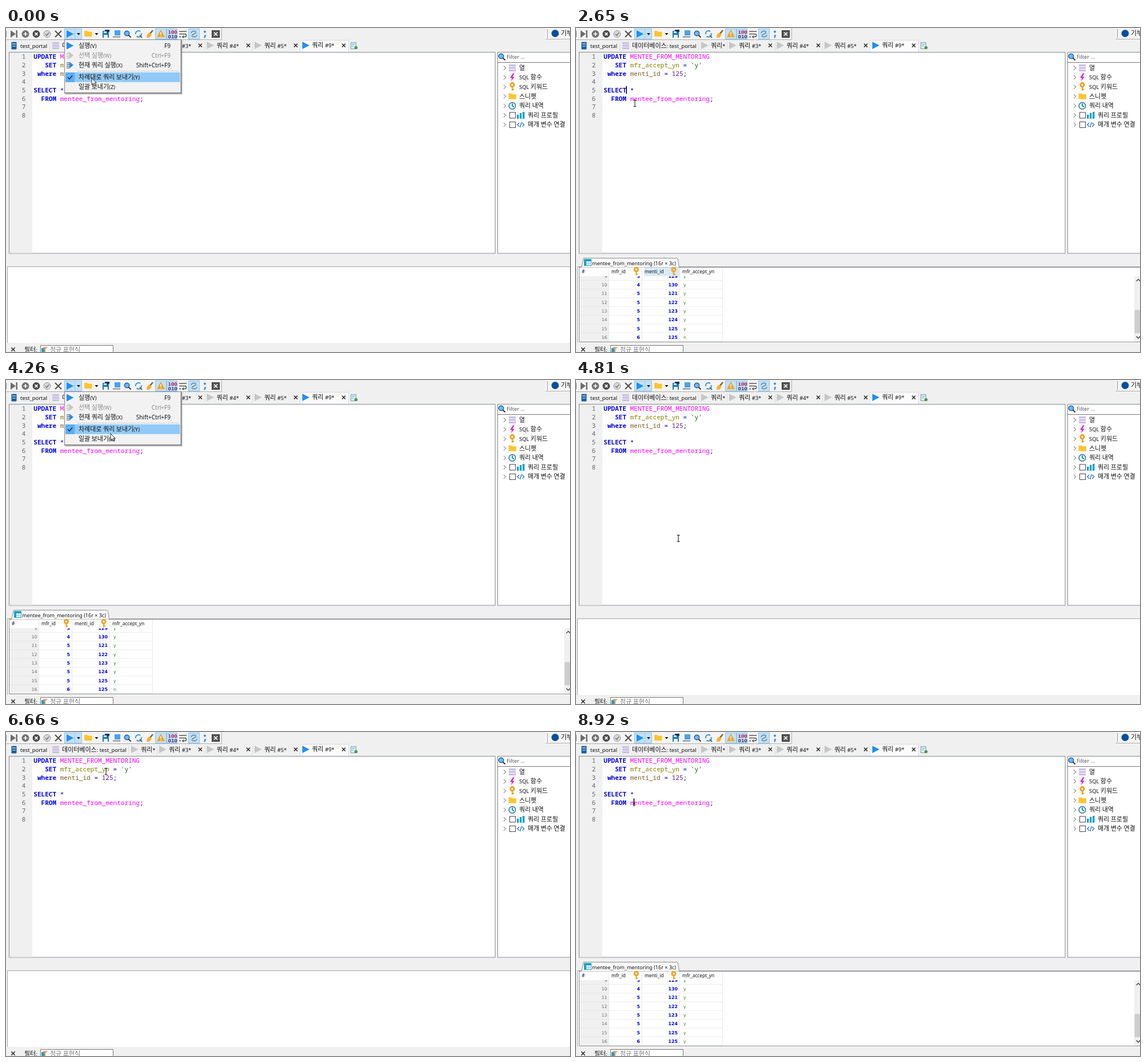
Animation, 987 px wide and 568 px high, one loop 8.95 s. Source, as an HTML page:

```html
<!DOCTYPE html>
<html lang="ko">
<head>
<meta charset="utf-8">
<title>SQL editor</title>
<style>
html, body { margin: 0; width: 100%; height: 100%; overflow: hidden; background: #f0f0f0; }
svg { display: block; width: 100%; height: 100%; }
text { white-space: pre; font-family: "Noto Sans", "Noto Sans CJK KR", "Noto Sans CJK", sans-serif; }
.code { font: 11.06px "Noto Sans Mono", "DejaVu Sans Mono", monospace; }
.num { font-family: "DejaVu Sans", sans-serif; }
</style>
</head>
<body>
<svg id="stage" viewBox="0 0 987 568"></svg>
<script>
const LOOP = 8950;
const BLUE = '#1e90f0', GRAY = '#6e6e6e', GOLD = '#ffc42e', LINE = '#868b92';

// Drawing helpers
const rect = (x, y, w, h, fill, stroke = 'none', extra = '') =>
  `<rect x="${x}" y="${y}" width="${w}" height="${h}" fill="${fill}" stroke="${stroke}" ${extra}/>`;
const path = (d, stroke, width = 1, fill = 'none') =>
  `<path d="${d}" fill="${fill}" stroke="${stroke}" stroke-width="${width}"/>`;
const shape = (d, fill) => `<path d="${d}" fill="${fill}"/>`;
const circle = (x, y, r, fill, stroke = 'none', width = 1) =>
  `<circle cx="${x}" cy="${y}" r="${r}" fill="${fill}" stroke="${stroke}" stroke-width="${width}"/>`;
const group = (id, body, extra = '') => `<g id="${id}" ${extra}>${body}</g>`;

// Hangul is set a little larger than the Latin letters beside it
const label = (x, y, s, fill = '#111', size = 9.4, extra = '') =>
  `<text x="${x}" y="${y}" font-size="${size}" fill="${fill}" ${extra}>` +
  s.replace(/[가-힣]+/g, h => `<tspan font-size="11">${h}</tspan>`) + '</text>';

const cross = (x, y, r, color = '#222', w = 1.5) =>
  path(`M${x - r} ${y - r}l${2 * r} ${2 * r}m0 ${-2 * r}l${-2 * r} ${2 * r}`, color, w);
const play = (x, y, fill) => shape(`M${x} ${y - 6.5}l12.5 6.5l-12.5 6.5z`, fill);
const drop = x => shape(`M${x - 3} 9h6l-3 3.5z`, '#111');
const folder = (x, y) => shape(`M${x} ${y - 5}h5l1.5 1.5h7v8.5h-13.5z`, GOLD);
const lens = (x, y) => circle(x, y, 4.3, '#6db8f2', '#245e9c', 1.4) + path(`M${x + 3} ${y + 3}l4 4`, '#333', 2);
const bars = (x, y) => [-4.5, 0, 4.5].map(d => rect(x, y + d - 1.7, 12, 3.4, '#c9bfe3')).join('');
const key = (x, y) => circle(x, y - 2.5, 3.2, 'none', '#f2a11c', 2.8) +
  path(`M${x} ${y}v7.5m0 -2h3`, '#f2a11c', 2.2);
const pressed = (x, w) => rect(x + .5, 1.5, w, 18, '#c3e0f7', '#8fc5f0');

function toolbar() {
  return rect(0, 0, 378, 21, '#f3f3f3') + path('M0 20.5H377.5V0', '#b0b0b0') +
    rect(0, 5, 1, 11, '#888') +
    shape('M8 4l9 6.5l-9 6.5z', GRAY) + rect(17.5, 4, 2.5, 13, GRAY) +
    circle(34, 10.5, 6.5, '#707070') + path('M30.5 10.5h7m-3.5 -3.5v7', '#fff', 1.7) +
    circle(53, 10.5, 6.5, '#4c4c4c') + cross(53, 10.5, 2.4, '#fff', 1.7) +
    circle(72, 10.5, 6, '#d8d8d8', '#999') + path('M69 10.5l2.3 2.5l4 -5', '#777', 1.5) +
    cross(91.5, 10.5, 5.5, '#4c4c4c', 2) +
    pressed(102, 18) + pressed(120, 12) + play(106, 10.5, BLUE) + drop(127) +
    folder(137, 10) + drop(158.5) +
    rect(169, 5, 11, 12, '#1878c0') + rect(171, 12, 7, 5, '#e8f4ff') + rect(173, 3, 8, 4, '#123c66') + rect(171, 6, 5, 3, '#e8f4ff') +
    rect(190, 4, 10, 9, '#4aa3e4') + path('M187 15.5h13', '#8a8a8a', 2) +
    lens(211.5, 9.5) +
    path('M227 11a5 5 0 0 1 8 -5m1.5 3a5 5 0 0 1 -8 5.5', BLUE, 1.7) + path('M234 13l4 4', '#555', 1.8) +
    path('M257 4l-5 6', '#8a5a24', 2.5) + shape('M247 11l4 -3l4 4l-4 5l-5 0z', '#f1b33b') +
    pressed(261, 19) + shape('M271 3l7 13h-14z', '#f2a31f') + path('M271 7.5v4m0 1.5v1.5', '#fff', 1.6) +
    pressed(281, 18) + label(283.5, 9.5, '100', '#a02048', 7.8, 'class="num" font-weight="700"') +
    label(283.5, 18, '010', '#46306e', 7.8, 'class="num" font-weight="700"') +
    path('M303 6h13m-13 4.5h10a2.5 2.5 0 0 1 0 5h-4m-6 0h3', '#555', 1.6) + shape('M311 13l-3.5 2.5l3.5 2.5z', '#555') +
    pressed(319, 19) + path('M324 9a5 4 0 0 1 9 -2m1 5a5 4 0 0 1 -9 2m0 -1l8 -5', '#6d88a2', 1.6) +
    circle(348, 6.5, 2, BLUE) + path('M348.5 12q.5 2.5 -1.5 5', BLUE, 2.5) +
    rect(360.5, 4.5, 13, 12, '#555', '#333') + cross(367, 10.5, 3, '#fff', 1.6) +
    rect(944, 0, 43, 19, '#f5f5f5') + path('M944.5 19.5H987', '#b0b0b0') +
    path('M947.5 2v16', '#999', 1) + circle(961, 9.5, 6.5, '#0a4f9c') + label(971, 13, '기부');
}

function tabs() {
  const query = (x, name, active, close) =>
    play(x, 30.5, active ? BLUE : '#c6c6c6') + label(x + 17, active ? 34 : 34.5, name) +
    (close ? cross(close, 30.5, 3) : '');
  return rect(9.5, 24.5, 9, 13, '#1d5f9e', 'none', 'rx="1"') + rect(11, 27, 6, 2, '#7fc4f4') + rect(11, 31, 6, 1.5, '#7fc4f4') +
    label(25, 34.5, 'test_portal') + bars(81, 31) + label(98, 34.5, '데이터베이스: test_portal') +
    path('M76.5 24v16M214.5 24v16M264.5 24v16M348.5 24v16M431.5 24v16', '#dedede') +
    rect(514.5, 21.5, 85, 21, '#fbfbfb', '#dcdcdc') +
    query(219, '쿼리*') + query(268, '쿼리 #3*', 0, 340) + query(351.5, '쿼리 #4*', 0, 424) +
    query(435, '쿼리 #5*', 0, 507) + query(518.5, '쿼리 #9*', 1, 591) +
    rect(603.5, 25.5, 9, 11, '#e3eef7', '#7f9bb0') + path('M605 28.5h6m-6 3h4', '#6fa5cc') + circle(612.5, 34.5, 2.8, '#3ea04a');
}

function editor() {
  const colors = { k: '#0000f0', t: '#ff00ff', c: '#808000', d: '#7d5a28', s: '#1c5a1c', n: '#5b1a80', o: '#0000c0' };
  const lines = [
    [0, 'kUPDATE', 't MENTEE_FROM_MENTORING'],
    [3, 'kSET', 'c mfr_accept_yn', 'o = ', "s'y'"],
    [1, 'kwhere', 'd menti_id', 'o = ', 'n125', 'o;'],
    [0],
    [0, 'kSELECT', 'o *'],
    [2, 'kFROM', 't mentee_from_mentoring', 'o;'],
    [0], [0]
  ];
  return rect(5.5, 42.5, 850.5, 352.5, '#fff', LINE) + rect(6, 43, 40, 351.5, '#f0f0f0') +
    lines.map(([indent, ...parts], i) => {
      const y = 54.4 + i * 14.62;
      const spans = parts.map(p => `<tspan fill="${colors[p[0]]}" font-weight="${p[0] === 'k' ? 700 : 400}">${p.slice(1)}</tspan>`);
      return `<text class="code" x="34.5" y="${y}" text-anchor="end" fill="#666">${i + 1}</text>` +
        `<text class="code" x="${48.3 + indent * 6.64}" y="${y}">${spans.join('')}</text>`;
    }).join('');
}

function sidebar() {
  const names = ['열', 'SQL 함수', 'SQL 키워드', '스니펫', '쿼리 내역', '쿼리 프로필', '매개 변수 연결'];
  const check = y => rect(881.5, y - 5, 10, 10, '#fff', '#444');
  const icons = [
    y => bars(880, y),
    y => shape(`M887 ${y - 7}l-5 8h3.5l-2 6l6.500 -8h-3.800l3.500 -6z`, '#d51ee0'),
    y => key(886, y - 1),
    y => folder(879.5, y),
    y => circle(886, y, 5.8, '#eaf7fc', '#28829e', 1.6) + path(`M886 ${y - 4}v4l3 2`, '#1d5369', 1.4),
    y => check(y) + rect(894, y - 1, 3.5, 7, '#19a6c4') + rect(899, y - 4, 3.5, 10, '#19a6c4') + rect(904, y - 6, 3.5, 12, '#19a6c4'),
    y => check(y) + path(`M898 ${y - 3.500}l-3 3.500l3 3.500m5.500 -7l3 3.500l-3 3.500m-1.300 -8l-2.500 9`, '#2472b4', 1.4)
  ];
  return rect(860.5, 42.5, 130, 352.5, '#fff', LINE) + path('M860 60.500H987', '#777') +
    lens(866.5, 49.5) + label(876, 54.3, 'Filter ...', '#555') +
    names.map((name, i) => {
      const y = 70 + i * 16.6;
      return path(`M871 ${y - 3.5}l3.800 3.500l-3.800 3.500`, '#8a8a8a', 1.1) + icons[i](y) + label(i > 4 ? 913 : 898, y + 3.8, name);
    }).join('');
}

function footer() {
  return rect(0, 552, 987, 16, '#f0f0f0') + cross(12.5, 563.5, 3.2) + label(32, 567.5, '필터:') +
    rect(60.5, 556.5, 127, 16, '#fff', '#777') +
    rect(62, 561, 6, 7, '#2a9cc0') + shape('M64 559h9l-3.500 4v5l-2.500 -2v-3z', '#f0a060') +
    label(77, 567.5, '정규 표현식', '#777');
}

const ROW = 15.28, MAX_SCROLL = 130.3;
const ids = [1, 1, 1, 2, 2, 3, 3, 3, 3, 4, 5, 5, 5, 5, 5, 6];

function grid() {
  const cell = (x, y, s, fill, size, extra) => label(x, y, String(s), fill, size, 'class="num" ' + extra);
  const end = 'text-anchor="end"', bold = end + ' font-weight="700"';
  const rows = ids.map((id, i) => {
    const y = 443 + i * ROW, base = y + 2.9;
    return path(`M58 ${y + 7.6}H257`, '#ececec') + path(`M6 ${y + 7.6}H57`, '#e6e6e6') +
      cell(54.5, base, i + 1, '#666', 7.6, end) + cell(112, base, id, '#0000f0', 7.9, bold) +
      cell(178, base, i === 15 ? 125 : 121 + i % 10, '#0000f0', 7.9, bold) +
      cell(188, base, 'y', '#2c852c', 7.8, i === 15 ? 'id="last"' : '');
  }).join('');
  return rect(5.5, 419.5, 990, 131, '#fff', LINE) +
    path('M9.500 419.500L13.500 403.500H176.500Q178 403.500 178.500 406L180.500 419.500', LINE, 1, '#fcfcfc') +
    rect(14.5, 405.5, 12, 11, '#e6f7fc', '#1ba0c2') + rect(14, 405, 13, 4, '#1ba0c2') + rect(14, 405, 4, 12, '#1ba0c2') +
    path('M18 412.500h9m-4.500 -3v7', '#8fd0e2') +
    label(28, 415.5, 'mentee_from_mentoring (16r × 3c)', '#111', 9) +
    rect(119, 420, 62, 15, '#d9ebf9', 'none', 'id="hover"') +
    label(10, 430.3, '#', '#111', 8.3) + label(62, 430.3, 'mfr_id', '#111', 8.3) +
    label(120, 430.3, 'menti_id', '#111', 8.3) + label(186, 430.3, 'mfr_accept_yn', '#111', 8.3) +
    key(105.5, 426) + key(171, 426) +
    rect(6, 435, 51.5, 115, '#f0f0f0') +
    `<g clip-path="url(#view)">${group('rows', rows)}</g>` +
    path('M57.500 420v130M115.500 420v130M181.500 420v130M256.500 420v130', '#e9e9e9') +
    rect(977, 435, 10, 115, '#f0f0f0') + path('M980.500 444l3.500 -3.500l3.500 3.500M980.500 540.500l3.500 3.500l3.500 -3.500', '#444', 1.3) +
    rect(977.5, 449.5, 10, 40.5, '#cdcdcd', 'none', 'id="thumb"');
}

const items = [
  { y: 31, text: '실행(V)', keys: 'F9' },
  { y: 48, text: '선택 실행(W)', keys: 'Ctrl+F9', off: true },
  { y: 65, text: '현재 쿼리 실행(X)', keys: 'Shift+Ctrl+F9' },
  { y: 86.3, text: '차례대로 쿼리 보내기(Y)' },
  { y: 103.5, text: '일괄 보내기(Z)' }
];

function menu() {
  return rect(104, 22, 205, 95, '#000', 'none', 'opacity=".18"') +
    rect(102.5, 20.5, 204, 93.5, '#f2f2f2', '#858585') + path('M103 114H306.500V21', '#777', 1.6) +
    path('M125 75.500H303', '#d0d0d0') +
    rect(104, 0, 200.5, 17, '#91c9f7', 'none', 'id="pick"') +
    rect(104, 78, 16, 17, '#58aef5') + path('M108 86.500l3 3l5 -6', '#123', 1.4) +
    play(106, 31, BLUE) +
    [[48, '#c4c4c4', '#c4c4c4'], [65, '#777', BLUE]].map(([y, a, b]) =>
      path(`M106 ${y - 4}h5m-5 3h5m-5 3h5m-5 3h5`, a, 1.4) + shape(`M111 ${y - 6}l7 6l-7 6z`, b)).join('') +
    items.map(({ y, text, keys, off }) => {
      const fill = off ? '#8a8a8a' : '#111';
      return label(127, y + 3.8, text, fill) + (keys ? label(288, y + 3.5, keys, fill, 10, 'text-anchor="end"') : '');
    }).join('');
}

document.getElementById('stage').innerHTML =
  '<clipPath id="view"><rect x="5" y="435" width="960" height="114.500"/></clipPath>' +
  rect(0, 0, 987, 568, '#f0f0f0') + toolbar() + tabs() + editor() + sidebar() +
  rect(3, 419, 984, 133, '#fff') + path('M2.500 552V418.500H987', '#a5a5a5') + path('M3 552.500H987', '#dcdcdc') +
  group('grid', grid()) + footer() +
  rect(0, 0, 1.6, 13.5, '#000', 'none', 'id="caret"') +
  group('menu', menu()) +
  group('arrow', path('M0 0V11.500L2.700 9L4.600 13L6.400 12.200L4.600 8.300H8.200Z', '#111', .9, '#fff')) +
  group('beam', path('M-2.500 -5.500H2.500M0 -5.500V5.500M-2.500 5.500H2.500', '#222', 1.1));

const el = {};
for (const id of ['grid', 'rows', 'thumb', 'last', 'hover', 'caret', 'menu', 'pick', 'arrow', 'beam'])
  el[id] = document.getElementById(id);

// Pointer stops: time, x, y
const stops = [
  [0, 150, 88], [30, 150, 88], [90, 152, 79], [340, 152, 79], [540, 165, 64], [640, 165, 64],
  [1190, 168, 455], [2090, 168, 455], [2270, 199, 534], [2650, 103, 132], [2820, 84, 84], [2990, 104, 40],
  [3200, 115, 50], [3500, 200, 46], [3880, 126, 9], [3930, 126, 9], [4260, 183, 94], [4520, 178, 65], [4600, 178, 65],
  [4980, 180, 430], [5140, 350, 300], [5320, 168, 193], [5440, 170, 96], [5660, 103, 119], [5710, 102, 121],
  [5900, 126, 9], [5960, 126, 9], [6180, 136, 107], [6480, 175, 65], [6640, 175, 65],
  [6900, 175, 278], [7150, 230, 507], [7360, 233, 540], [7550, 233, 540], [7750, 230, 507], [8400, 232, 543],
  [8600, 232, 543], [8880, 780, 543]
];
const menuSpans = [[0, 610], [3930, 4570], [5940, 6630]];
const scrolls = [[1290, 46], [1410, 92], [1530, MAX_SCROLL], [6900, 0], [7800, 46], [7950, 92], [8100, MAX_SCROLL]];
// Caret clicks: time, x, y
const clicks = [[1300, 87.5, 102], [3200, 114, 43.5], [5690, 100.7, 116.5]];

function pointer(t) {
  const i = stops.findIndex(s => s[0] > t);
  if (i < 0) return stops[stops.length - 1].slice(1);
  const [a, b] = [stops[i - 1], stops[i]];
  const u = (t - a[0]) / (b[0] - a[0]), e = u * u * (3 - 2 * u);
  return [a[1] + (b[1] - a[1]) * e, a[2] + (b[2] - a[2]) * e];
}
const latest = (list, t) => list.filter(s => s[0] <= t).pop();
const show = (node, on) => node.setAttribute('visibility', on ? 'visible' : 'hidden');
const move = (node, x, y) => node.setAttribute('transform', `translate(${x.toFixed(2)} ${y.toFixed(2)})`);

function draw(t) {
  const [x, y] = pointer(t);
  const open = menuSpans.some(([a, b]) => t >= a && t < b);
  const filled = (t >= 880 && t < 4700) || t >= 6850;
  const text = !open && y > 42 && y < 395 && x > 46 && x < 856;
  const visible = t < 8880;

  el.grid.style.display = filled ? '' : 'none';
  const scroll = (latest(scrolls, t) || [0, 0])[1];
  move(el.rows, 0, -scroll);
  move(el.thumb, 0, scroll / MAX_SCROLL * 45);
  el.last.textContent = t < 5000 ? 'n' : 'y';
  el.hover.style.display = t >= 2370 && t < 3930 ? '' : 'none';

  const click = latest(clicks, t);
  show(el.caret, click && (t - click[0]) % 1060 < 530);
  if (click) move(el.caret, click[1], click[2]);

  el.menu.style.display = open ? '' : 'none';
  const item = items.find(o => !o.off && Math.abs(y - o.y) <= 8.5);
  el.pick.style.display = item && x > 102 ? '' : 'none';
  if (item) el.pick.setAttribute('y', item.y - 8.5);

  show(el.arrow, visible && !text);
  show(el.beam, visible && text);
  move(el.arrow, x, y);
  move(el.beam, x, y);
}

const start = performance.now();
function tick() {
  draw((performance.now() - start) % LOOP);
  requestAnimationFrame(tick);
}
tick();
</script>
</body>
</html>
```
